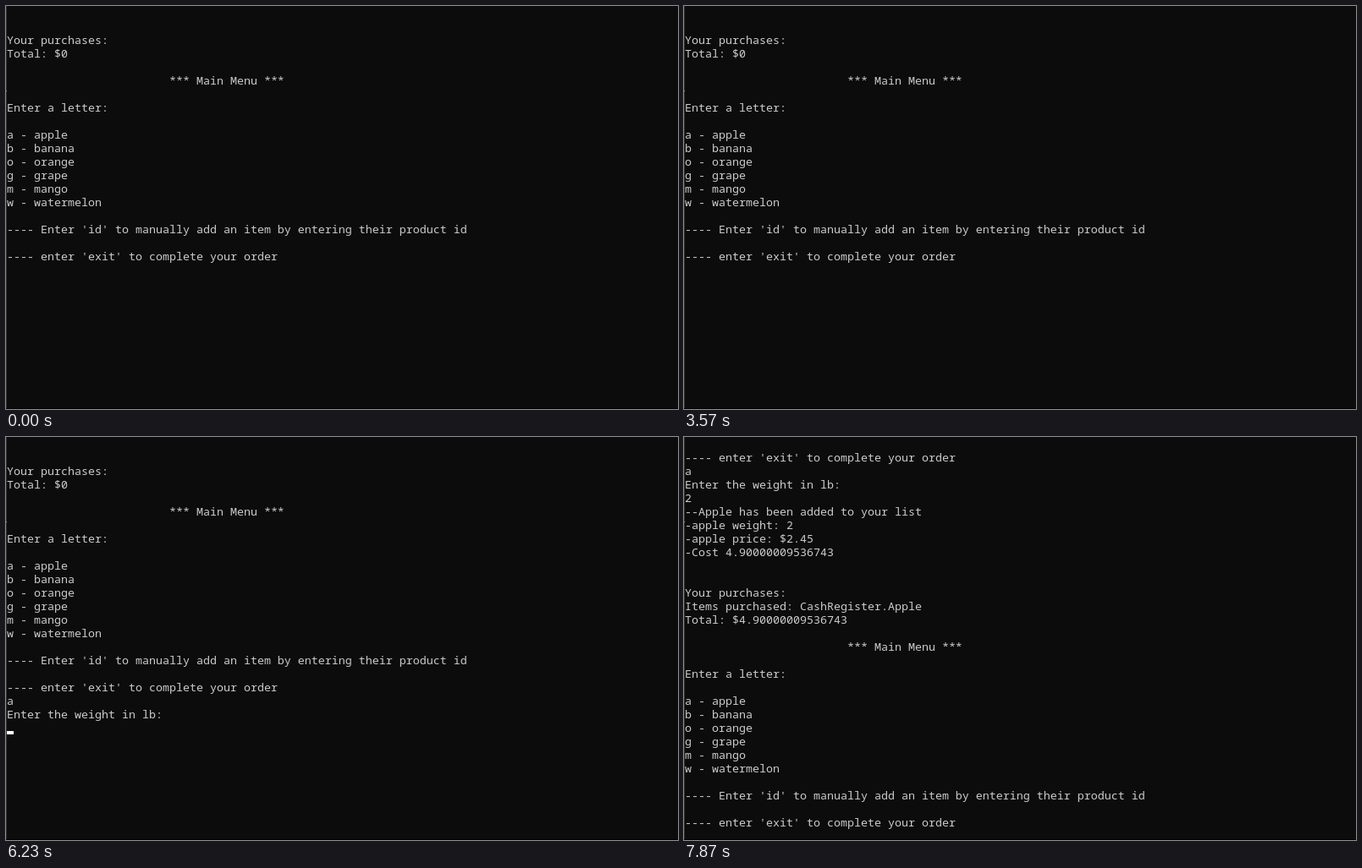
An HTML page for the animation above (8000 ms loop, 794 by 477 pixels).

```html
<!DOCTYPE html>
<html lang="en">
<head>
<meta charset="utf-8">
<title>Fruit register console</title>
<style>
  html, body { margin: 0; width: 100%; height: 100%; overflow: hidden; background: #0c0c0c; }
  #stage { position: relative; width: 794px; height: 477px; overflow: hidden; }
  #screen {
    position: absolute; left: 1px; top: 0; margin: 0; color: #ccc;
    font: 13.3333px/16px "Noto Sans Mono", monospace; font-variant-ligatures: none;
  }
  #cursor { position: absolute; width: 8px; height: 4px; background: #fff; }
  .edge { position: absolute; background: #333; }
  #left { left: 0; top: 0; width: 1px; height: 477px; }
  #bottom { left: 0; top: 476px; width: 794px; height: 1px; background: #000; }
  #speck { left: 0; top: 100px; width: 1px; height: 1px; background: #999; }
</style>
</head>
<body>
<div id="stage">
  <pre id="screen"></pre>
  <div id="left" class="edge"></div>
  <div id="bottom" class="edge"></div>
  <div id="speck" class="edge"></div>
  <div id="cursor"></div>
</div>
<script>
const LOOP = 8000, COLUMN = 8, ROW = 16;
const screen_ = document.getElementById('screen');
const cursor = document.getElementById('cursor');

const exitLine = "---- enter 'exit' to complete your order\n";
const menu = ' '.repeat(24) + `*** Main Menu ***

Enter a letter:

a - apple
b - banana
o - orange
g - grape
m - mango
w - watermelon

---- Enter 'id' to manually add an item by entering their product id

` + exitLine;

const start = '\n\nYour purchases:\nTotal: $0\n\n' + menu;
const letter = start + 'a';
const weight = letter + '\nEnter the weight in lb:\n';
const receipt = '\n' + exitLine + `a
Enter the weight in lb:
2
--Apple has been added to your list
-apple weight: 2
-apple price: $2.45
-Cost 4.90000009536743


Your purchases:
Items purchased: CashRegister.Apple
Total: $4.90000009536743

` + menu;

// [start time, console text, cursor visible]
const steps = [
  [0, start, false], [910, start, true], [1460, start, false], [2010, start, true],
  [2560, start, false], [3110, start, true], [3570, start, false],
  [3650, letter, true], [3890, letter, false],
  [3970, weight, true], [4680, weight, false], [5220, weight, true],
  [5770, weight, false], [6230, weight, true], [6780, weight + '2', false],
  [6930, receipt, true], [7870, receipt, false]
];

let shown;
function show(step) {
  if (step === shown) return;
  shown = step;
  const [, text, visible] = step;
  const lines = text.split('\n');
  screen_.textContent = text;
  cursor.style.left = 1 + lines.at(-1).length * COLUMN + 'px';
  cursor.style.top = lines.length * ROW - 4 + 'px';
  cursor.style.visibility = visible ? 'visible' : 'hidden';
}

const origin = performance.now();
function draw() {
  const time = (performance.now() - origin) % LOOP;
  show(steps.findLast(([from]) => from <= time));
  requestAnimationFrame(draw);
}
draw();
</script>
</body>
</html>
```
